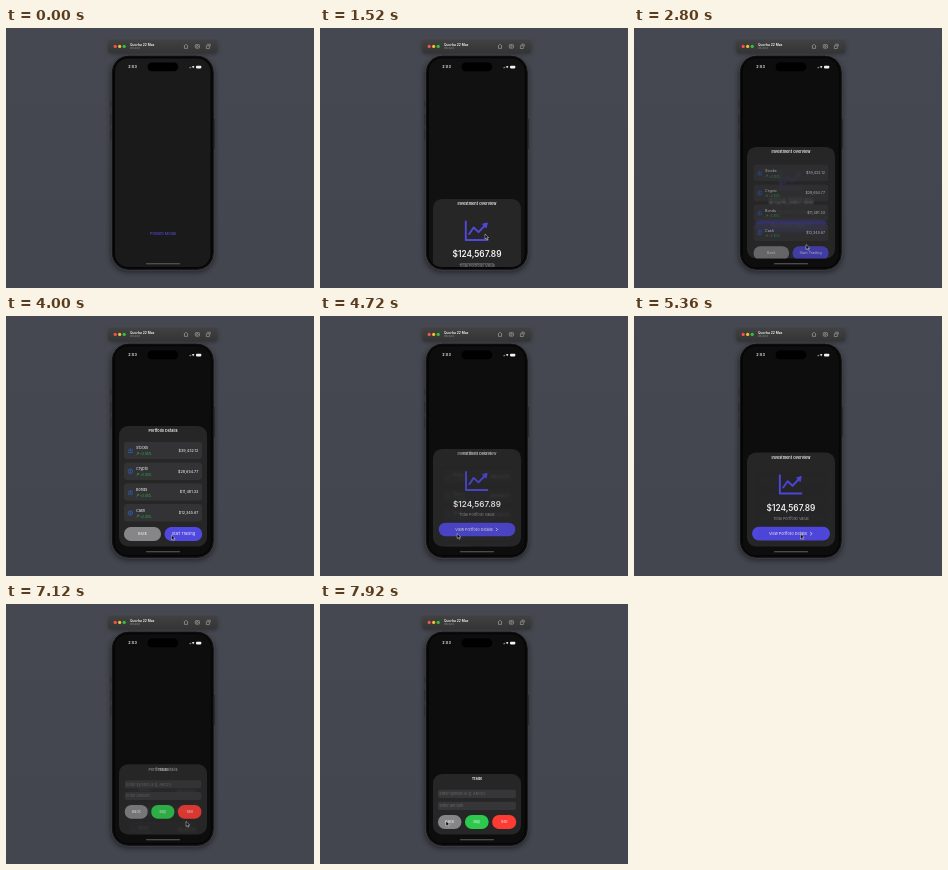
An HTML page that plays this animation: 308x260 px, repeating every 8000 ms.

```html
<!DOCTYPE html>
<html lang="en">
<head>
<meta charset="utf-8">
<title>Investment sheet</title>
<style>
  html, body { margin: 0; width: 100%; height: 100%; overflow: hidden; background: #454851; }
  svg { display: block; width: 100vw; height: 100vh; }
  text { font-family: Inter, Roboto, sans-serif; font-size: 3.8px; fill: #f4f4f6; }
  .mid { text-anchor: middle; }
  .end { text-anchor: end; }
  .bold { font-weight: 600; }
</style>
</head>
<body>
<svg viewBox="0 0 308 260" xmlns="http://www.w3.org/2000/svg">
  <defs>
    <linearGradient id="wall" x2="0" y2="1">
      <stop stop-color="#464851"/><stop offset="1" stop-color="#44464f"/>
    </linearGradient>
    <linearGradient id="bar" x2="0" y2="1">
      <stop stop-color="#414142"/><stop offset="1" stop-color="#343435"/>
    </linearGradient>
    <filter id="soft" x="-20%" y="-20%" width="140%" height="140%"><feGaussianBlur stdDeviation="2.4"/></filter>
    <clipPath id="screen"><rect x="109" y="30.5" width="95.5" height="208.5" rx="13"/></clipPath>
    <clipPath id="inside"><rect id="insideBox" x="113" width="88" rx="9"/></clipPath>
  </defs>

  <rect width="308" height="260" fill="url(#wall)"/>
  <rect x="104" y="29" width="105" height="216" rx="18" opacity=".4" filter="url(#soft)"/>
  <rect x="103" y="14" width="108" height="12" rx="3" opacity=".35" filter="url(#soft)"/>

  <g id="toolbar">
    <rect x="102.5" y="12" width="108.5" height="13.3" rx="2.6" fill="url(#bar)"/>
    <circle cx="109.2" cy="18.4" r="1.6" fill="#f4544d"/>
    <circle cx="113.7" cy="18.4" r="1.6" fill="#f5bd30"/>
    <circle cx="118.2" cy="18.4" r="1.6" fill="#31c440"/>
    <text x="124" y="17.8" class="bold" style="font-size:3.3px">Quorba 22 Max</text>
    <text x="124" y="21.4" style="font-size:2.7px;fill:#9a9a9c">OS 22.0</text>
    <g fill="none" stroke="#b4b4b6" stroke-width=".55">
      <path d="M177.8 18.3 180 16.2 182.2 18.3M178.5 18V20.4H181.5V18"/>
      <rect x="189.3" y="16.6" width="4.2" height="3.6" rx=".7"/><circle cx="191.4" cy="18.4" r=".9"/>
      <path d="M200.4 17.6H203.3V20.5H200.4ZM201.2 16.2H204.2V18.6"/>
    </g>
  </g>

  <g id="phone">
    <path d="M208.3 91V121M105.3 73V79M105.3 86V97M105.3 101V112" stroke="#1c1c1f" stroke-width="1.2"/>
    <rect x="105.6" y="27.4" width="102.3" height="214.6" rx="17" fill="#050505" stroke="#55565a" stroke-width=".6"/>
    <rect x="106.4" y="28.2" width="100.7" height="213" rx="16.3" fill="none" stroke="#161617" stroke-width=".8"/>
  </g>

  <g clip-path="url(#screen)">
    <rect x="109" y="30" width="96" height="210" fill="#1a1a1a"/>
    <text x="157" y="207.3" class="mid" style="fill:#5752de">Present Modal</text>
    <rect id="dim" x="109" y="30" width="96" height="210"/>
    <g id="sheet">
      <rect id="card" x="113" width="88" rx="9" fill="#262627"/>
      <g id="pages" clip-path="url(#inside)"></g>
    </g>
    <rect x="140" y="235.2" width="34" height="1.1" rx=".55" fill="#606062"/>
  </g>

  <g id="status">
    <text x="122.3" y="40.4" class="bold">2:03</text>
    <rect x="141.5" y="34.6" width="30.7" height="8.6" rx="4.3"/>
    <path d="M183.7 40.2V39.4M184.7 40.2V38.8" stroke="#ddd" stroke-width=".6"/>
    <path d="M185.9 38.6Q187.2 37.4 188.5 38.6L187.2 40.2Z" fill="#eee"/>
    <rect x="190" y="37.7" width="5.3" height="2.7" rx=".8" fill="#f2f2f2"/>
  </g>

  <path id="cursor" d="M0 0V5L1.2 4 2 5.8 2.9 5.4 2.1 3.6H3.7Z" fill="#050505" stroke="#f2f2f2" stroke-width=".45"/>
</svg>

<script>
const LOOP = 8000, BOTTOM = 230.5, CX = 157;
const PURPLE = '#5049df', GRAY = '#868689', BLUE = '#2c68d8', GREEN = '#30b850';
const $ = id => document.getElementById(id);

// Page parts are laid out with y measured from the sheet's top edge.
const label = (x, y, s, cls = '', css = '') =>
  `<text x="${x}" y="${y}" class="${cls}" style="${css}">${s}</text>`;
const box = (x, y, w, h, r, fill) =>
  `<rect x="${x}" y="${y}" width="${w}" height="${h}" rx="${r}" fill="${fill}"/>`;
const button = (x, y, w, s, fill) =>
  box(x, y, w, 14, 6.8, fill) + label(x + w / 2, y + 8.3, s, 'mid');

function overview() {
  return `<g fill="none" stroke="${PURPLE}" stroke-width="1.9" stroke-linecap="round" stroke-linejoin="round">
      <path d="M145.8 22.5V41H167.5M149.2 35 153.6 28.6 158.5 33.2 166 25.4"/>
      <path d="M162.8 25.2 167.3 24 166.3 28.6Z" fill="${PURPLE}" stroke-width="1"/></g>`
    + label(CX, 58.2, '$124,567.89', 'mid bold', 'font-size:8.3px')
    + label(CX, 67.6, 'Total Portfolio Value', 'mid', 'fill:#98989c')
    + box(118, 74.2, 78, 13.8, 6.8, PURPLE)
    + label(154, 82.4, 'View Portfolio Details', 'mid')
    + '<path d="M176.3 79.4 178 81.1 176.3 82.8" fill="none" stroke="#fff" stroke-width=".7"/>';
}

function asset([name, gain, value], i) {
  const y = 15.7 + i * 20.8;
  return box(118, y, 78, 17.4, 3.4, '#333335')
    + `<g fill="none" stroke="${BLUE}" stroke-width=".7">`
    + (i % 2 ? `<circle cx="124.4" cy="${y + 8.9}" r="2.2"/><path d="M124.4 ${y + 7.6}v2.6"/>`
             : `<path d="M122 ${y + 10.8}h4.8M122.8 ${y + 9.6}v-2M124.4 ${y + 9.6}v-3M126 ${y + 9.6}v-2.4"/>`)
    + '</g>' + label(130, y + 7.8, name)
    + `<path d="M130.4 ${y + 13.2}l2.2-2.2m-1.5 0h1.5v1.5" fill="none" stroke="${GREEN}" stroke-width=".5"/>`
    + label(134, y + 13.6, gain, '', `font-size:3.1px;fill:${GREEN}`)
    + label(192.4, y + 10.1, value, 'end');
}

function portfolio() {
  return [
    ['Stocks', '+2.45%', '$39,432.12'],
    ['Crypto', '+2.45%', '$28,654.77'],
    ['Bonds', '+2.45%', '$11,481.33'],
    ['Cash', '+2.45%', '$12,345.67'],
  ].map(asset).join('')
    + button(118, 101, 37, 'Back', GRAY) + button(158.6, 101, 37.6, 'Start Trading', PURPLE);
}

function trade() {
  const field = (y, s) => box(118, y, 78, 8.2, 1.8, '#363638')
    + label(119.6, y + 5.4, s, '', 'fill:#68686c');
  return field(15.8, 'Enter symbol (e.g. ABCD)') + field(27.8, 'Enter amount')
    + button(118, 41, 23.4, 'Back', GRAY) + button(145, 41, 23.6, 'Buy', '#2dc84c')
    + button(172.2, 41, 24, 'Sell', '#fc3b34');
}

const pages = [
  { top: 137, title: 'Investment Overview', body: overview() },
  { top: 110, title: 'Portfolio Details', body: portfolio() },
  { top: 170, title: 'Trade', body: trade() },
];
$('pages').innerHTML = pages.map(p =>
  `<g><g>${p.body}</g>${label(CX, 6.4, p.title, 'mid bold')}</g>`).join('');
pages.forEach((p, i) => {
  p.node = $('pages').children[i];
  [p.content, p.heading] = p.node.children;
});

const OPEN = 1330;
const switches = [[2610, 0, 1], [4440, 1, 0], [5345, 0, 1], [6850, 1, 2]];

// time, x, y of the pointer's tip
const path = [
  [400, 190, 237], [1200, 165, 206], [2200, 165, 206], [2480, 172, 216.5],
  [3500, 172, 216.5], [4000, 165.5, 219], [4320, 137, 217.5], [4700, 137, 217.5],
  [5200, 166.5, 218], [6120, 166.5, 218], [6320, 183, 217.5], [6720, 181, 217.5],
  [7000, 181, 217.5], [7600, 172, 217], [7700, 172, 217], [7920, 126, 217],
];

const clamp = v => Math.min(1, Math.max(0, v));
const mix = (a, b, k) => a + (b - a) * k;

function spring(ms) {
  if (ms <= 0) return 0;
  const x = ms * 0.012;
  return 1 - (1 + x) * Math.exp(-x);
}

function pointer(t) {
  let i = path.findIndex(p => p[0] > t);
  if (i < 0) return path[path.length - 1].slice(1);
  if (i === 0) return path[0].slice(1);
  const a = path[i - 1], b = path[i];
  const k = (t - a[0]) / (b[0] - a[0]), e = k * k * (3 - 2 * k);
  return [mix(a[1], b[1], e), mix(a[2], b[2], e)];
}

function showPage(p, top, vis, heading) {
  p.node.style.display = vis > 0.002 || heading > 0 ? '' : 'none';
  p.node.setAttribute('transform', `translate(0 ${top})`);
  const mid = (BOTTOM - p.top) / 2, s = mix(0.88, 1, vis);
  p.content.setAttribute('transform', `translate(${CX} ${mid}) scale(${s}) translate(${-CX} ${-mid})`);
  p.content.style.opacity = vis;
  p.content.style.filter = vis < 0.985 ? `blur(${(1 - vis) * 1.3}px)` : 'none';
  p.heading.style.opacity = heading;
}

function draw(t) {
  const up = spring(t - OPEN);
  $('dim').setAttribute('opacity', up * 0.5);
  $('sheet').setAttribute('transform', `translate(0 ${(1 - up) * 102})`);
  $('sheet').style.display = up > 0 ? '' : 'none';

  const [start, from, to] = switches.filter(s => s[0] <= t).pop() || [-LOOP, 0, 0];
  const k = spring(t - start), head = clamp((t - start - 190) / 150);
  const top = mix(pages[from].top, pages[to].top, k);
  for (const id of ['card', 'insideBox']) {
    $(id).setAttribute('y', top);
    $(id).setAttribute('height', BOTTOM - top);
  }
  pages.forEach((p, i) => {
    if (i === to) showPage(p, top, k, head);
    else if (i === from) showPage(p, top, 1 - k, 1 - head);
    else showPage(p, top, 0, 0);
  });
  // The arriving page lies over the leaving one.
  if ($('pages').lastChild !== pages[to].node) $('pages').appendChild(pages[to].node);

  const [x, y] = pointer(t);
  $('cursor').setAttribute('transform', `translate(${x} ${y})`);
  $('cursor').style.display = t < path[0][0] ? 'none' : '';
}

const begin = performance.now();
function tick() {
  draw((performance.now() - begin) % LOOP);
  requestAnimationFrame(tick);
}
tick();
</script>
</body>
</html>
```
